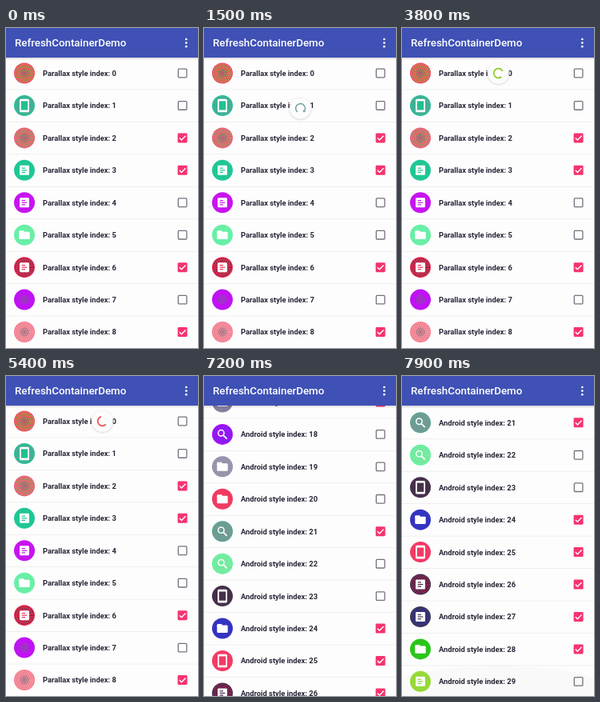
Recreate the animation shown at these times as an HTML page with a canvas. Size 240x400 px, loop 8 s.

```html
<!DOCTYPE html>
<html lang="en">
<head>
<meta charset="utf-8">
<title>RefreshContainerDemo</title>
<style>
  html, body { margin: 0; height: 100%; overflow: hidden; background: #fdfdfd; }
  canvas { display: block; width: 100vw; height: 100vh; }
</style>
</head>
<body>
<canvas id="stage"></canvas>
<script>
const W = 240, H = 400, LOOP = 8000, STEP = 100;
const BAR = 37, PITCH = 40.44, FIRST = 56.5, LIST_END = 847.4;
const TAU = Math.PI * 2;
const canvas = document.getElementById('stage');
const ctx = canvas.getContext('2d');
const dpr = window.devicePixelRatio || 1;
canvas.width = W * dpr;
canvas.height = H * dpr;

// Each row: icon, checked, disc colour, optional ring colour.
const parse = text => text.trim().split('\n').map(line => {
  const [icon, checked, color, ring] = line.trim().split(' ');
  return { icon, checked: checked === '1', color, ring };
});

const parallaxRows = parse(`
  print 0 #f04a62 #84c03c
  phone 0 #22c090 #8c8ca6
  print 1 #ee5a74 #8fae62
  doc 1 #1fc795
  doc 0 #c714f0
  folder 0 #69efa6
  doc 1 #ec3058 #5a2838
  print 0 #c012f4
  print 1 #f4788c #eeb0b4`);

const androidRows = parse(`
  search 1 #453a50
  phone 0 #48cf5e #8fa59c
  print 1 #ff4a7c #ff5cc0
  folder 1 #50a434 #5d4358
  folder 0 #33315e
  print 1 #3a3870
  print 1 #ff4370 #ff66b4
  print 0 #f04f5c #dd5574
  print 1 #393270 #2626d8`);
const filler = ['folder', 'search', 'doc', 'phone'];
for (let i = 9; i < 17; i++) {
  androidRows.push({ icon: filler[i % 4], checked: i % 3 > 0, color: `hsl(${i * 77 % 360} 65% 52%)` });
}
androidRows.push(...parse(`
  folder 1 #8f8098 #6f78a8
  search 0 #b414f4 #4826f4
  folder 0 #8d8ca6 #b4a2b4
  folder 0 #f03a62
  search 1 #5aa48e #9a8ca0
  search 0 #5cf09c #a4e0a8
  phone 0 #45304a
  folder 1 #3434c0
  phone 1 #f23b66
  doc 1 #45284a #c02450
  doc 1 #403a50 #2828c0
  folder 1 #2ac61a
  doc 0 #98dc38`));

const clamp = (v, lo = 0, hi = 1) => Math.min(hi, Math.max(lo, v));
const easeOut = u => 1 - (1 - u) ** 2;
const easeInOut = u => u * u * (3 - 2 * u);
const mod = (a, n) => ((a % n) + n) % n;

function disc(x, y, r, color) {
  ctx.fillStyle = color;
  ctx.beginPath();
  ctx.arc(x, y, r, 0, TAU);
  ctx.fill();
}

function arc(x, y, r, from, to, color, width) {
  ctx.strokeStyle = color;
  ctx.lineWidth = width;
  ctx.beginPath();
  ctx.arc(x, y, r, from, to);
  ctx.stroke();
}

function box(x, y, w, h, r, color) {
  ctx.fillStyle = color;
  ctx.beginPath();
  ctx.roundRect(x, y, w, h, r);
  ctx.fill();
}

function line(points, color, width) {
  ctx.strokeStyle = color;
  ctx.lineWidth = width;
  ctx.beginPath();
  points.forEach(([x, y]) => ctx.lineTo(x, y));
  ctx.stroke();
}

// Glyphs are centred on the origin.
const glyphs = {
  folder() {
    box(-6.7, -5.5, 6.4, 4, 1.2, '#fff');
    box(-6.7, -4, 13.4, 9.4, 1.2, '#fff');
  },
  search() {
    arc(-1.6, -1.6, 3.7, 0, TAU, '#fff', 1.5);
    line([[1.2, 1.2], [5.7, 5.7]], '#fff', 1.8);
  },
  doc(color) {
    box(-6, -6, 12, 12, 1.3, '#fff');
    line([[-3.3, -2.6], [1, -2.6]], color, 1.2);
    line([[-3.3, 0], [3.3, 0]], color, 1.2);
    line([[-3.3, 2.6], [1, 2.6]], color, 1.2);
  },
  phone(color) {
    box(-6, -8.3, 12, 16.6, 1.6, '#fff');
    box(-4.2, -5.6, 8.4, 11.2, 0, color);
  },
  print() {
    for (const r of [1, 3, 5]) arc(0, 0, r, 0, TAU, 'rgba(110,110,120,.75)', 0.9);
  }
};

function avatar(y, { icon, color, ring }) {
  ctx.save();
  ctx.translate(23, y);
  disc(0, 0, 13, color);
  if (ring) {
    ctx.setLineDash([1.3, 1.3]);
    for (const r of [3.5, 6, 8.5, 11]) arc(0, 0, r, 0, TAU, ring, 1.6);
    ctx.setLineDash([]);
  }
  glyphs[icon](color);
  ctx.restore();
}

function checkbox(y, checked) {
  if (checked) {
    box(214.6, y - 6, 12, 12, 1.4, '#f5336f');
    line([[216.8, y], [219.4, y + 2.7], [224.5, y - 2.6]], '#fff', 1.4);
  } else {
    ctx.strokeStyle = '#77717f';
    ctx.lineWidth = 1.3;
    ctx.beginPath();
    ctx.roundRect(215.3, y - 5.3, 10.6, 10.6, 1);
    ctx.stroke();
  }
}

function list(rows, style, scroll) {
  ctx.font = 'bold 9.33px Roboto, sans-serif';
  rows.forEach((row, i) => {
    const y = FIRST + i * PITCH - scroll;
    if (y < 10 || y > H + 25) return;
    avatar(y, row);
    ctx.fillStyle = '#292336';
    ctx.fillText(`${style} style index: ${i}`, 46, y + 3.4);
    checkbox(y, row.checked);
    ctx.fillStyle = '#e9e9e9';
    ctx.fillRect(0, y + 20.1, W, 0.7);
  });
}

function toolbar() {
  const shade = ctx.createLinearGradient(0, BAR, 0, BAR + 3);
  shade.addColorStop(0, 'rgba(0,0,0,.15)');
  shade.addColorStop(1, 'rgba(0,0,0,0)');
  ctx.fillStyle = shade;
  ctx.fillRect(0, BAR, W, 3);
  ctx.fillStyle = '#3f51b5';
  ctx.fillRect(0, 0, W, BAR);
  ctx.fillStyle = '#fff';
  ctx.font = '500 13.33px Roboto, sans-serif';
  ctx.fillText('RefreshContainerDemo', 11, 23.3);
  for (const y of [14, 18.6, 23.2]) disc(225.3, y, 1.35, '#fff');
}

function pullArrow(pull) {
  const end = (0.72 + 0.4 * pull) * TAU;
  const color = '#6d9a9c';
  ctx.globalAlpha = 0.3 + 0.7 * pull;
  arc(0, 0, 5.83, end - 0.8 * TAU * pull, end, color, 1.5);
  ctx.rotate(end);
  ctx.fillStyle = color;
  ctx.beginPath();
  ctx.moveTo(3.5, 0);
  ctx.lineTo(8.1, 0);
  ctx.lineTo(5.8, 2.4);
  ctx.fill();
}

// The arc grows, then shrinks, each turn while the ring keeps rotating.
function spinArc(t) {
  const turns = (t - 3174) / 1332;
  const cycle = Math.floor(turns), p = turns - cycle;
  const grow = 0.79 * easeInOut(clamp(p * 2));
  const cut = 0.79 * easeInOut(clamp(p * 2 - 1));
  const base = 0.76 + cycle * 0.79 + turns * 0.81;
  const color = ['#33b5e5', '#8cc820', '#f5444c'][mod(cycle + 1, 3)];
  arc(0, 0, 5.83, (base + cut) * TAU, (base + grow + 0.01) * TAU, color, 1.67);
}

function spinner(t) {
  if (t < 800 || t >= 6300) return;
  const pull = easeOut(clamp((t - 800) / 1000));
  const settle = easeOut(clamp((t - 2400) / 300));
  const y = 24 + 84 * pull - 51.5 * settle;
  const scale = 1 - clamp((t - 6100) / 160);
  if (scale <= 0) return;
  ctx.save();
  ctx.translate(120.5, y);
  ctx.scale(scale, scale);
  ctx.shadowColor = 'rgba(0,0,0,.2)';
  ctx.shadowBlur = 2.5 * dpr;
  ctx.shadowOffsetY = 0.7 * dpr;
  disc(0, 0, 13.3, '#fcfcfc');
  ctx.shadowColor = 'transparent';
  if (t < 2700) pullArrow(pull);
  else spinArc(t);
  ctx.restore();
}

function edgeGlow(t) {
  const fade = t >= 7900 ? 0.5 : t >= 7300 ? clamp((7700 - t) / 400) : 0;
  ctx.fillStyle = `rgba(0,0,0,${0.03 * fade})`;
  ctx.beginPath();
  ctx.ellipse(120, H + 10, 165, 48, 0, 0, TAU);
  ctx.fill();
}

function draw(now) {
  const t = Math.floor(now % LOOP / STEP) * STEP;
  ctx.setTransform(canvas.width / W, 0, 0, canvas.height / H, 0, 0);
  ctx.fillStyle = '#fdfdfd';
  ctx.fillRect(0, 0, W, H);
  if (t < 6100) list(parallaxRows, 'Parallax', 0);
  else list(androidRows, 'Android', clamp((t - 6971) * 3.107, 0, LIST_END));
  spinner(t);
  edgeGlow(t);
  toolbar();
  requestAnimationFrame(() => draw(performance.now() - start));
}

const start = performance.now();
draw(0);
</script>
</body>
</html>
```
